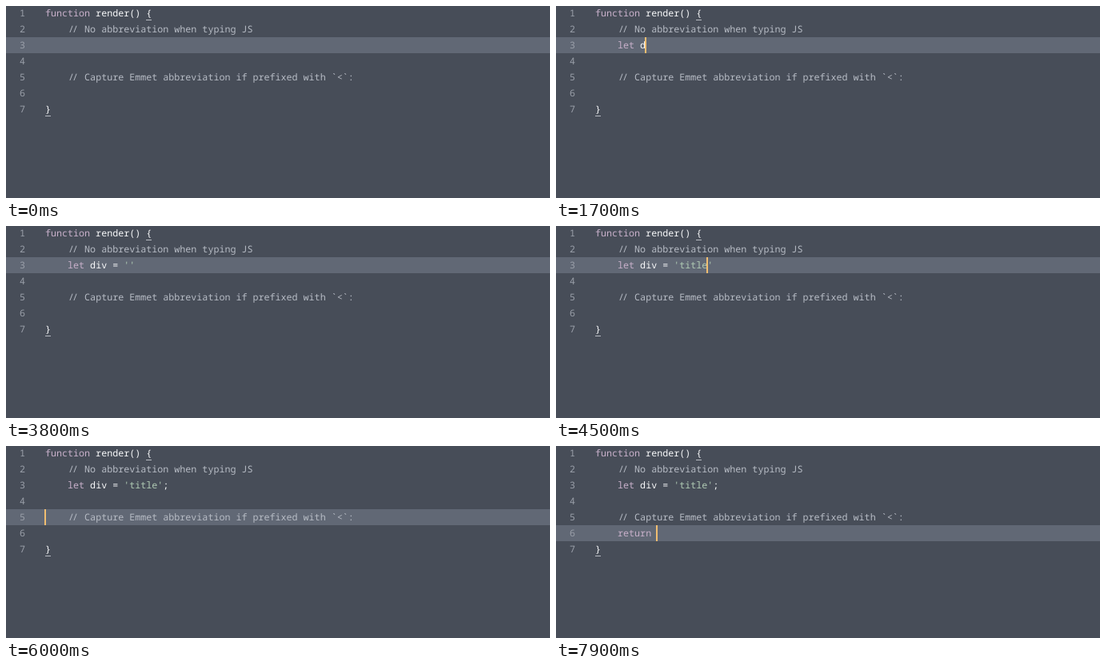
Animation, 680 px wide and 240 px high, one loop 8000 ms. Source, as an HTML page:

```html
<!DOCTYPE html>
<html lang="en">
<head>
<meta charset="utf-8">
<title>Editor typing</title>
<style>
html, body { margin: 0; width: 100%; height: 100%; overflow: hidden; background: #474d58; }
#stage { position: relative; width: 680px; height: 240px; overflow: hidden; color: #f8f9fa;
  font: 11.7px/20px "Noto Sans Mono", "DejaVu Sans Mono", monospace; text-rendering: geometricPrecision; }
#stage div { position: absolute; height: 20px; white-space: pre; }
#stage .num { width: 24px; text-align: right; color: #9a9fa9; }
#stage .code { left: 49px; }
#active { width: 680px; background: #616875; }
#caret { width: 2px; background: #f0bd70; }
.w { font-weight: 500; }
.k { color: #c9b1cb; font-weight: 400; }
.c { color: #b7bcc5; }
.s { color: #b0cbb4; font-weight: 400; }
.slash { letter-spacing: -2px; margin: 0 3px 0 1px; }
.brace { display: inline-block; height: 19px; border-bottom: 1px solid #b9bdc4; box-sizing: border-box; vertical-align: top; }
</style>
</head>
<body>
<div id="stage"><div id="active"></div></div>
<script>
const stage = document.getElementById('stage');
const active = document.getElementById('active');
const span = (cls, text) => `<span class="${cls}">${text}</span>`;
const comment = text => '    ' + span('c', span('slash', '//') + text);
const rowTop = line => line * 20 - 21 + 'px';

function add(cls, line, html) {
  const el = document.createElement('div');
  el.className = cls;
  el.style.top = rowTop(line);
  el.innerHTML = html;
  return stage.appendChild(el);
}

const fixed = {
  1: span('k', 'function') + span('w', ' render() ') + span('w brace', '{'),
  2: comment(' No abbreviation when typing JS'),
  5: comment(' Capture Emmet abbreviation if prefixed with `&lt;`:'),
  7: span('w brace', '}')
};
const rows = {};
for (let n = 1; n <= 7; n++) {
  add('num', n, n);
  rows[n] = add('code', n, fixed[n] || '');
}
const caret = add('', 3, '');
caret.id = 'caret';

// Editing steps: time, line, text before the caret, text after it
const tab = '    ';
const steps = [[-550, 3, '', '']];
function type(line, before, chars, times, after = '') {
  times.forEach((t, i) => steps.push([t, line, before += chars[i], after]));
  return before;
}
let typed = type(3, '', [tab, ...'let div = '],
  [700, 1000, 1150, 1300, 1450, 1700, 1800, 1900, 2100, 2300, 2500]);
typed = type(3, typed, "'title", [3250, 3900, 4000, 4150, 4300, 4500], "'");
type(3, typed, "';", [4800, 5200]);
steps.push([5800, 4, '', ''], [5950, 5, '', ''], [6100, 6, '', '']);
type(6, '', [tab, ...'return '], [6850, 7000, 7150, 7300, 7400, 7500, 7700, 7850]);

const paint = code => span('w', code
  .replace(/'.*'/, m => span('s', m))
  .replace(/\b(let|return)\b/, m => span('k', m)));

// Soft blink, restarted by each edit
function blink(age) {
  const p = age % 800;
  return Math.max(0, Math.min(1, (Math.abs(p - 550) - 50) / 200));
}

let shown = -1;
function show(index) {
  const lines = { 3: '', 6: '' };
  for (const [, line, before, after] of steps.slice(0, index + 1))
    if (line in lines) lines[line] = before + after;
  for (const n in lines) rows[n].innerHTML = paint(lines[n]);
  const [, line, before] = steps[index];
  active.style.top = caret.style.top = rowTop(line);
  caret.style.left = Math.round(48 + before.length * 7.02) + 'px';
  shown = index;
}

const startTime = performance.now();
function draw() {
  const t = (performance.now() - startTime) % 8000;
  const index = steps.filter(step => step[0] <= t).length - 1;
  if (index !== shown) show(index);
  caret.style.opacity = blink(t - steps[index][0]);
  requestAnimationFrame(draw);
}
draw();
</script>
</body>
</html>
```
